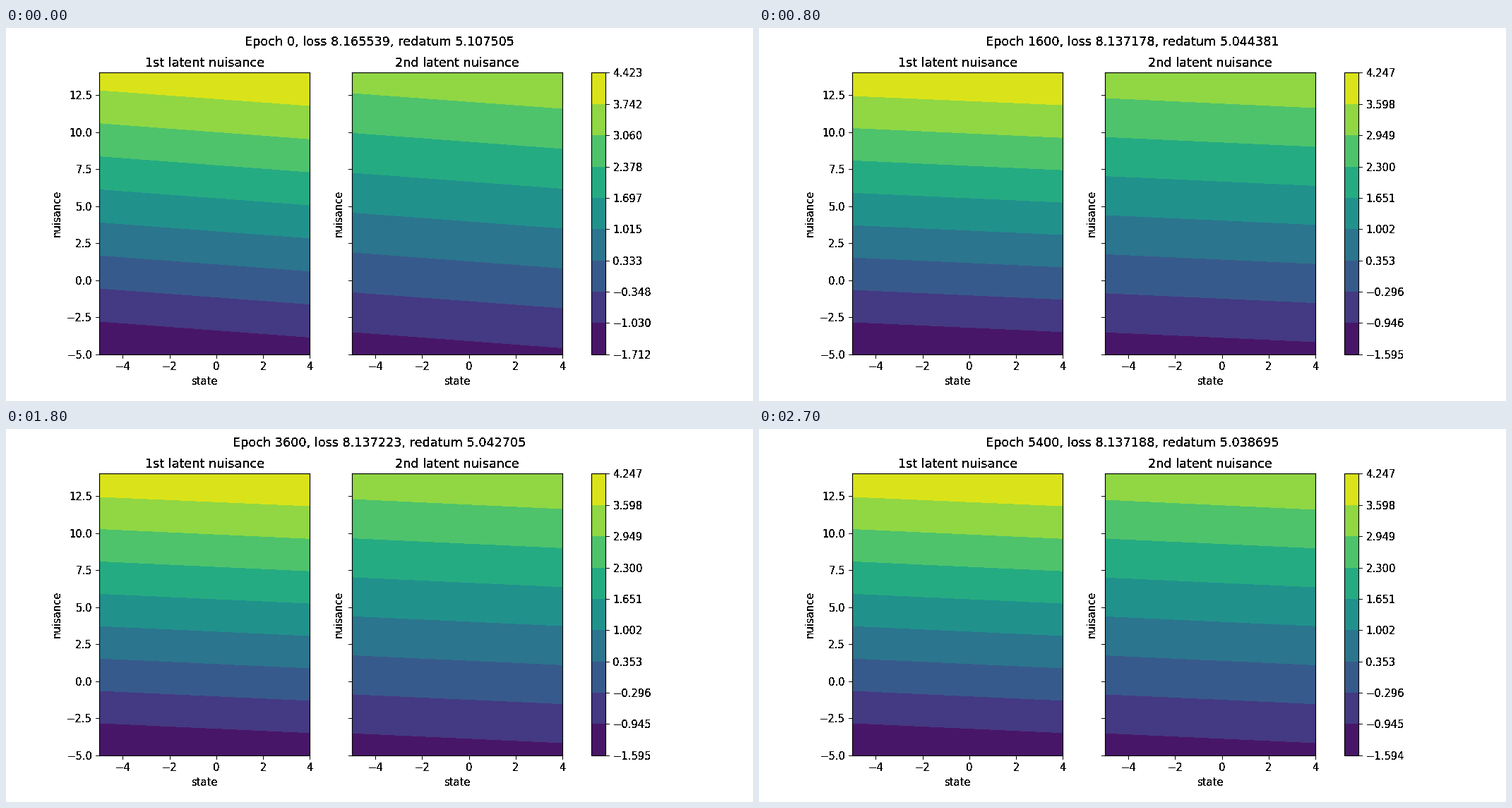
Animation, 1058 px wide and 529 px high, one loop 2750 ms. Source, as a matplotlib script:

```python
import numpy as np
import matplotlib.pyplot as plt
from matplotlib.animation import FuncAnimation
from matplotlib.cm import ScalarMappable
from matplotlib.colors import BoundaryNorm, ListedColormap

WIDTH, HEIGHT, DPI = 1058, 529, 105.8
FRAMES, INTERVAL = 55, 50
BANDS = 9
X_MIN, X_MAX, Y_MIN, Y_MAX = -5, 4, -5, 14

plt.rcParams["font.family"] = "DejaVu Sans"
band_colors = plt.get_cmap("viridis")((np.arange(BANDS) + 0.5) / BANDS)
X, Y = np.meshgrid([X_MIN, X_MAX], [Y_MIN, Y_MAX])
noise = np.random.default_rng(4).normal(size=(FRAMES, 2))


def harden(image, dpi):
    """Make edge pixels solid, for crisp heavy lettering."""
    image = image.copy()
    image[..., 3] = image[..., 3] > 0.3
    return image, 0, 0


fig, axes = plt.subplots(1, 2, sharey=True, figsize=(WIDTH / DPI, HEIGHT / DPI), dpi=DPI)
fig.subplots_adjust(left=0.125, right=0.9, bottom=0.125, top=0.88, wspace=0.2)
fig.patch.set_facecolor("white")
heading = fig.suptitle("", fontsize=12)

for ax, name in zip(axes, ("1st", "2nd")):
    ax.set(xlim=(X_MIN, X_MAX), ylim=(Y_MIN, Y_MAX), xlabel="state", ylabel="nuisance")
    ax.set_title(f"{name} latent nuisance", fontsize=12)

scale = ScalarMappable(BoundaryNorm(range(BANDS + 1), BANDS), ListedColormap(band_colors))
bar = fig.colorbar(scale, ax=axes, ticks=list(range(BANDS + 1)))
bar.minorticks_off()

panel_parts = [part for ax in axes for part in (ax.title, ax.xaxis, ax.yaxis)]
for artist in (heading, bar.ax.yaxis, *panel_parts):
    artist.set_agg_filter(harden)

contours = []


def update(step):
    # Training rings down from its start values, then drifts slowly.
    ring = np.exp(-step / 2.4) * np.cos(np.pi * step / 8)
    drift = step / (FRAMES - 1)

    def settle(start, end):
        return end + (start - end) * ring

    low, high = settle(-1.7116, -1.5945), settle(4.4233, 4.247)
    tilt = settle(0.119, 0.073)
    loss_noise, redatum_noise = noise[step] * (1 - ring)
    loss = 8.1374 + 0.028139 * ring**2 + 0.00015 * loss_noise
    redatum = settle(5.107505, 5.045) - 0.009 * drift + 0.002 * redatum_noise

    # Each panel is a tilted plane; the first one spans the whole range.
    levels = np.linspace(low, high, BANDS + 1)
    lean = tilt * (X - X_MAX)
    slope = (high - low) / (Y_MAX - Y_MIN + tilt * (X_MAX - X_MIN))
    first = high + slope * (Y - Y_MAX + lean)
    lowest_edge = settle(-4.555, -4.149)
    band_height = settle(2.689, 2.638) - 0.01 * drift
    second = levels[1] + (levels[1] - levels[0]) / band_height * (Y - lowest_edge + lean)

    while contours:
        contours.pop().remove()
    edges = levels.copy()
    edges[[0, -1]] += [-1e-6, 1e-6]
    for ax, surface in zip(axes, (first, second)):
        contours.append(ax.contourf(X, Y, surface, levels=edges, colors=band_colors))

    bar.ax.set_yticklabels([f"{v:.3f}".replace("-", "\u2212") for v in levels])
    heading.set_text(f"Epoch {100 * step}, loss {loss:.6f}, redatum {redatum:.6f}")
    return []


anim = FuncAnimation(fig, update, frames=FRAMES, interval=INTERVAL, repeat=True, repeat_delay=0)
plt.show()
```
